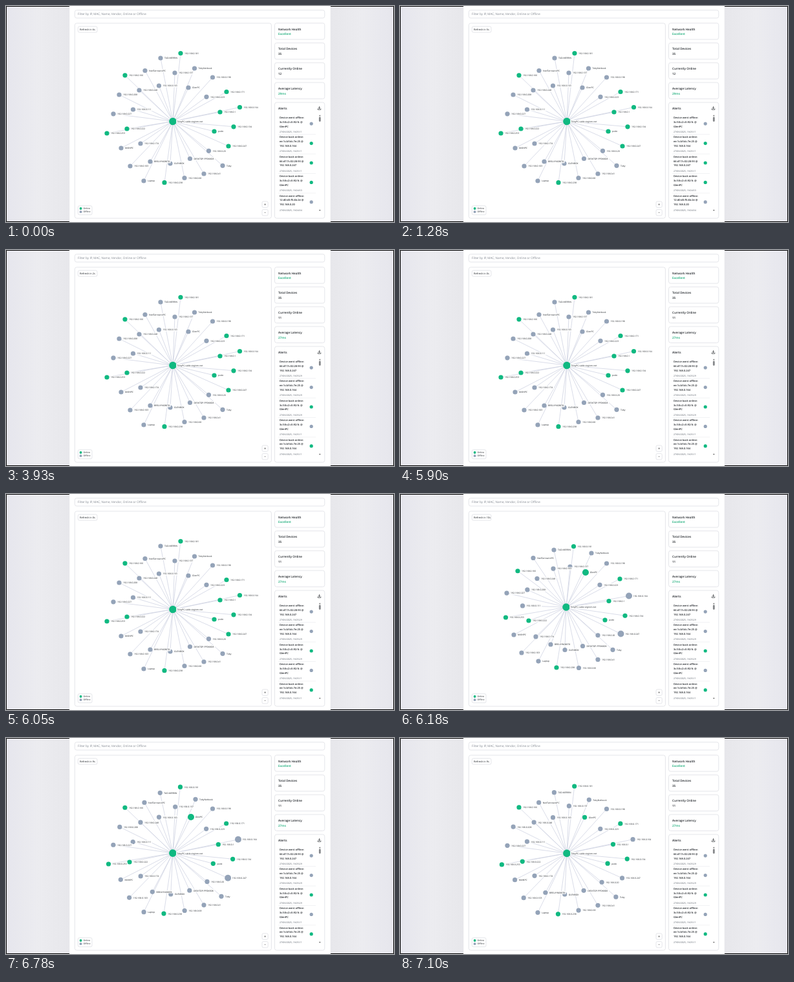
An HTML page for the animation above (7140 ms loop, 600 by 336 pixels).

```html
<!DOCTYPE html>
<html lang="en">
<head>
<meta charset="utf-8">
<title>Network dashboard</title>
<style>
  html, body { margin: 0; width: 100%; height: 100%; overflow: hidden; background: #fff; }
  svg { display: block; width: 600px; height: 336px; }
  text { font-family: "Open Sans", "Noto Sans", sans-serif; text-rendering: geometricPrecision; }
  .box { fill: #fff; stroke: #dadce1; stroke-width: .7; }
  .edge { stroke: #cdd0e1; stroke-width: .75; }
</style>
</head>
<body>
<svg id="stage" viewBox="0 0 600 336" xmlns="http://www.w3.org/2000/svg">
  <defs>
    <linearGradient id="side">
      <stop offset="0" stop-color="#e6e6ed"/>
      <stop offset=".5" stop-color="#ececf0"/>
      <stop offset="1" stop-color="#e7e7eb"/>
    </linearGradient>
  </defs>
  <rect width="600" height="336" fill="#fff"/>
  <rect width="98.3" height="336" fill="url(#side)"/>
  <rect x="-600" width="98.3" height="336" fill="url(#side)" transform="scale(-1 1)"/>
  <path d="M98 .5H.5V335.5H98M502 .5H599.5V335.5H502" fill="none" stroke="#000"/>
</svg>
<script>
const LOOP = 7140, ALERT_AT = 1550, REFRESH_AT = 6100, POSE_AT = 6180, CALM_AT = 6960;
const GREEN = '#10b981', GREY = '#94a3b8', INK = '#1f2328';
const stage = document.getElementById('stage');

function add(tag, attrs, parent = stage) {
  const el = document.createElementNS('http://www.w3.org/2000/svg', tag);
  set(el, attrs);
  parent.appendChild(el);
  return el;
}
function set(el, attrs) { for (const k in attrs) el.setAttribute(k, attrs[k]); }
const group = parent => add('g', {}, parent);
const box = (x, y, width, height, rx = 3) => add('rect', { class: 'box', x, y, width, height, rx });
const dot = (cx, cy, r, fill, parent) => add('circle', { cx, cy, r, fill }, parent);

// y is the middle of the line
function write(str, x, y, size, fill = INK, weight = 400, parent = stage) {
  const el = add('text', { x, y: y + size * .36, 'font-size': size, fill, 'font-weight': weight }, parent);
  el.textContent = str;
  return el;
}

// Panels
box(106.4, 6.4, 386.4, 12.4);
write('Filter by IP, MAC, Name, Vendor, Online or Offline', 111, 12.6, 4.65, '#7f858e');
box(106.4, 26.8, 304, 303.4);

function card(i, title, value, color = INK) {
  const y = 26.6 + i * 30.8;
  box(415.5, y, 77.3, 25.4);
  write(title, 421, y + 9.3, 4.65, INK, 600);
  return write(value, 421, y + 17, 4.6, color, 600);
}
card(0, 'Network Health', 'Excellent', '#0ea872');
card(1, 'Total Devices', '35');
const online = card(2, 'Currently Online', '12');
const latency = card(3, 'Average Latency', '29ms', '#0ea872');

// Alerts
box(415.5, 150, 77.3, 180.2);
write('Alerts', 421, 159, 4.8, INK, 600);
add('path', { d: 'M484.5 156v3.6M483 158.2l1.5 1.6 1.5-1.6M482.2 159.6v1.6h4.6v-1.6', fill: 'none', stroke: INK, 'stroke-width': .7 });
add('path', { d: 'M483.8 171.2l1.5-2 1.5 2zM483.8 317l1.5 2 1.5-2z', fill: '#777' });
add('rect', { x: 483.9, y: 172.6, width: 2.8, height: 7.4, rx: 1.4, fill: '#85878a' });

const PC = '3c:58:c2:c5:92:fc', EE = 'ee:1c:bf:dc:7e:25', SIX = '66:d7:7c:02:28:93', IP = '192.168.0.';
const alerts = [
  [0, SIX, IP + 247, '05:29'],
  [0, EE, IP + 164, '05:29'],
  [1, PC, 'GlenPC', '05:29'],
  [0, PC, 'GlenPC', '05:11'],
  [1, EE, IP + 164, '05:11'],
  [1, SIX, IP + 247, '05:11'],
  [1, PC, 'GlenPC', '04:53'],
  [0, '12:d0:d3:f5:4b:2e', IP + 20, '04:34'],
];
function alertList(first) {
  const g = group();
  alerts.slice(first, first + 5).forEach(([up, mac, host, time], i) => {
    const y = 173.3 + i * 30.45;
    [up ? 'Device back online:' : 'Device went offline:', mac + ' @', host]
      .forEach((line, j) => write(line, 423, y + j * 6.9, 4, INK, 600, g));
    write('27/06/2025, 16:' + time, 423, y + 22.2, 3.55, '#4f5661', 400, g);
    dot(472.2, y + 9.8, 2.6, up ? GREEN : GREY, g);
    if (i < 4) add('path', { d: `M421 ${y + 26.4}h58`, stroke: '#e3e5e9', 'stroke-width': .5 }, g);
  });
  return g;
}
const oldAlerts = alertList(3), newAlerts = alertList(0);

// label, rest x, rest y, shift x, shift y after the refresh, settling rate
const nodes = [
  ['181', 270, 73.5, -1.5, 8],
  ['TAD-MERRIN', 239, 81, -1, 6, .3],
  ['TobyNetbook', 291.5, 97, 4.5, -5],
  ['NedTarrowickPC', 215, 100.5, -9, -1, 2],
  ['166', 184, 107.8, -2, 12, 3],
  ['137', 261, 104, 2, 9],
  ['198', 319.5, 111, 0, -3],
  ['163', 236.5, 124, .5, -8, 2],
  ['GlenPC', 282, 127, 5, -5, .2],
  ['248', 206, 131, 6, .5],
  ['208', 175, 138, 22, 11, 3],
  ['171', 341, 133.5, -1, -1.5],
  ['223', 310, 141.3, -1, 0],
  ['164', 361.5, 157.5, -7.5, 1],
  ['1', 331, 165, -8, 1.5],
  ['111', 196.5, 161, -7, 13, 3],
  ['227', 166, 167.8, -1, -13.8, 2],
  ['134', 352, 187.8, -4, 1.5],
  ['pode', 322, 195, -5, 1],
  ['222', 187, 191, 12, 6],
  ['253', 156, 198, 7.5, -6],
  ['247', 344, 218, -2.5, -.5],
  ['174', 208, 214, 2, 8, 2],
  ['MAINPC', 178, 221, -2, -2],
  ['20', 313.5, 225.3, -7.5, -5.5],
  ['DESKTOP-PPDK8D8', 284.5, 237.5, -2, -1],
  ['Toby', 335, 248.3, -6, -6],
  ['BRELVYN08878', 223, 242, 10, -8],
  ['GLENBOX', 254, 245, 1, -2.5, .2],
  ['103', 192, 249, -4, -2],
  ['41', 306, 261, 0, -3.5],
  ['68', 276, 267.5, .5, 3],
  ['Laptop', 213, 272, 1, -12, 2],
  ['238', 245, 274.7, -3, -4.7],
].map(([name, x, y, dx, dy, rate = 1]) => ({ name, x, y, dx, dy, rate }));
const hub = { name: 'TobyPC.cable.virginm.net', x: 258, y: 179.5, dx: -1, dy: -3.5, rate: 2, hub: true };
nodes.push(hub);

const UP = ['181', '166', '171', '164', '1', '134', 'pode', '222', '253', '247', '238'];
const FLIPPED = ['GlenPC', '164', '247'];
const edgeLayer = group(), nodeLayer = group(), labelLayer = group();
for (const n of nodes) {
  const label = /^\d+$/.test(n.name) ? IP + n.name : n.name;
  n.up = n.hub || UP.includes(n.name);
  n.flips = FLIPPED.includes(n.name);
  n.edge = add('line', { class: 'edge' }, edgeLayer);
  n.disc = dot(0, 0, 3.6, GREY, nodeLayer);
  n.label = group(labelLayer);
  const pad = add('rect', { x: 4.6, y: -2.4, height: 4.8, fill: '#fff', 'fill-opacity': .9 }, n.label);
  const text = write(label, 6.1, .2, 3.4, INK, 500, n.label);
  pad.setAttribute('width', text.getComputedTextLength() + 3);
}

// Graph overlays
box(111.4, 31.8, 29.6, 9.2, 2);
const timer = write('', 114, 36.4, 4, INK, 500);
box(111.4, 310.8, 21.6, 14, 2);
dot(115.6, 315, 1.9, GREEN);
dot(115.6, 320.2, 1.9, GREY);
write('Online', 119.5, 315, 3.5, INK, 500);
write('Offline', 119.5, 320.2, 3.5, INK, 500);
box(396, 304, 9.2, 9.4, 2);
box(396, 316.6, 9.2, 9.4, 2);
add('path', { d: 'M399.2 308.7h2.8M400.6 307.3v2.8M399.4 321.3h2.4', stroke: '#444', 'stroke-width': .5 });

function secondsLeft(t) {
  if (t >= REFRESH_AT) return t < 6400 ? 10 : 9;
  return Math.max(0, 6 - Math.floor((t + 600) / 1000));
}

function draw(t) {
  const fresh = t >= ALERT_AT, moved = t >= REFRESH_AT;
  timer.textContent = `Refresh in ${secondsLeft(t)}s`;
  online.textContent = fresh ? '11' : '12';
  latency.textContent = fresh ? '27ms' : '29ms';
  oldAlerts.style.display = fresh ? 'none' : '';
  newAlerts.style.display = fresh ? '' : 'none';

  for (const n of nodes) {
    const k = moved ? Math.exp((POSE_AT - t) / 550 * n.rate) : 0;
    n.cx = n.x + n.dx * k;
    n.cy = n.y + n.dy * k;
    const changed = n.flips && moved;
    const big = changed && t < CALM_AT;
    const fill = n.up !== changed ? GREEN : GREY;
    set(n.disc, { cx: n.cx, cy: n.cy, r: n.hub ? 5.8 : big ? 5 : 3.6, fill });
    n.label.setAttribute('transform', `translate(${n.cx + (n.hub || big ? .6 : 0)} ${n.cy})`);
  }
  for (const n of nodes) set(n.edge, { x1: hub.cx, y1: hub.cy, x2: n.cx, y2: n.cy });
}

const start = performance.now();
function tick() {
  draw((performance.now() - start) % LOOP);
  requestAnimationFrame(tick);
}
tick();
</script>
</body>
</html>
```
